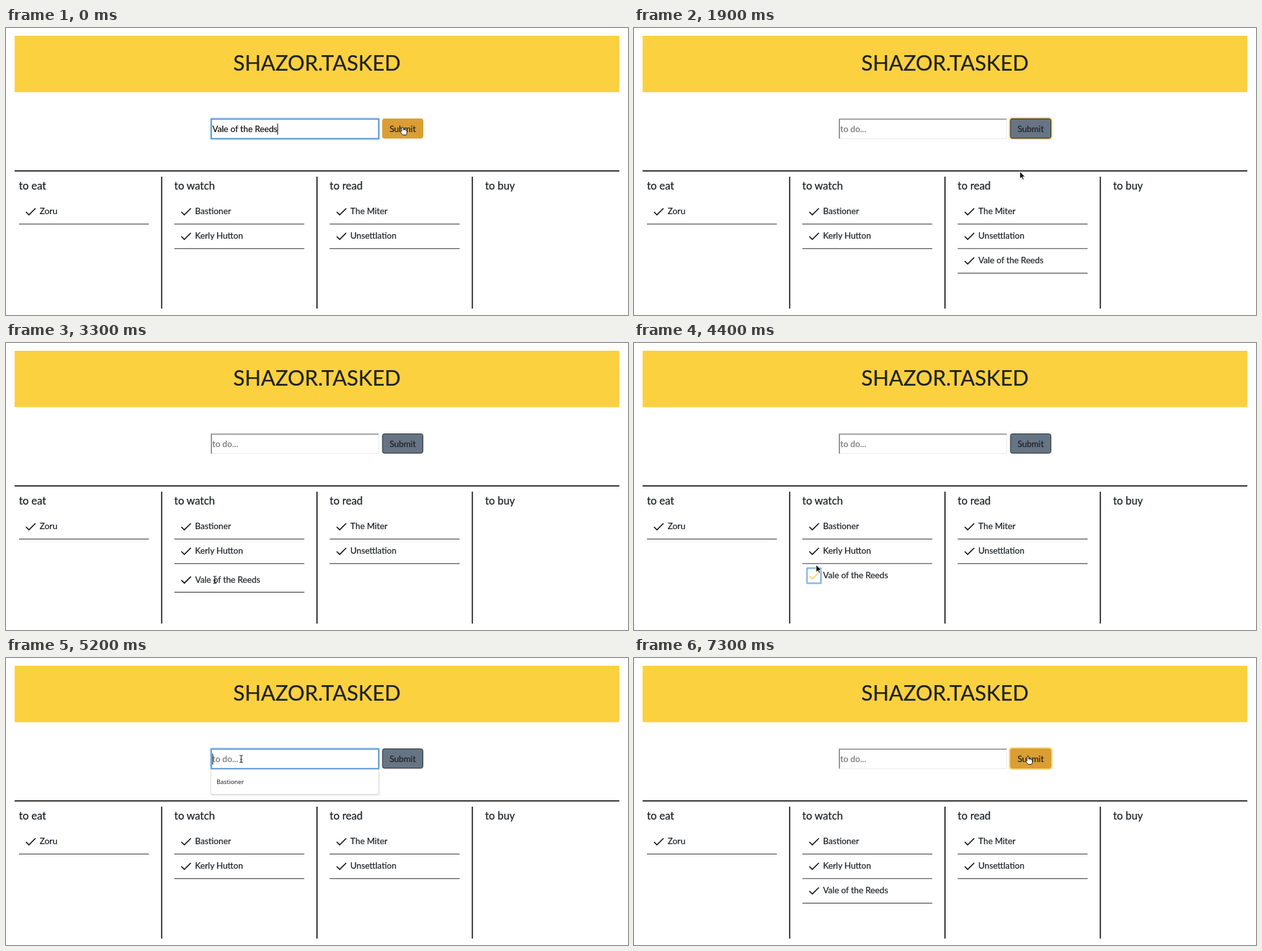
Animation of 960x444 px, one loop 7400 ms. Source, as an HTML page:

```html
<!DOCTYPE html>
<html lang="en">
<head>
<meta charset="utf-8">
<title>To-do list</title>
<style>
  html, body { margin: 0; width: 100%; height: 100%; overflow: hidden; background: #fff; }
  svg { display: block; width: 100%; height: 100%; }
  text {
    font: 13.2px Lato, "Open Sans", sans-serif; white-space: pre;
    color: #1d2125; fill: currentColor; stroke: currentColor; stroke-width: .22;
  }
  .title { font-size: 32.7px; text-anchor: middle; }
  .heading { font-size: 16.4px; }
  .tick { fill: none; stroke: #111; stroke-width: 1.7; }
  .suggestion { font: 9.4px "Noto Sans", sans-serif; stroke: none; }
</style>
</head>
<body>
<svg viewBox="0 0 960 444">
  <rect width="960" height="444" fill="#fff"/>
  <rect x="13.3" y="12" width="933.3" height="87.3" fill="#fcd140"/>
  <text class="title" x="480" y="66">SHAZOR.TASKED</text>

  <g id="plainField" fill="none">
    <path d="M316 171H575V140" stroke="#e6e6e6"/>
    <path d="M317 171V141H575" stroke="#858585" stroke-width="1.7"/>
  </g>
  <g id="focusField" fill="none">
    <rect x="316.3" y="140.3" width="259.4" height="31.4" rx="1.5" stroke="#a5cdf8" stroke-width="3"/>
    <rect x="317" y="141" width="258" height="30" stroke="#4b8acb" stroke-width="1.3"/>
  </g>
  <text id="entry" x="318.5" y="160.5"></text>
  <path id="caret" stroke="#111" stroke-width="1.1" d="M0 148V165"/>

  <rect id="ring" x="578.5" y="138" width="67.5" height="35" rx="5" fill="#fcd980"/>
  <rect id="button" x="581" y="140.5" width="62.5" height="30" rx="3"/>
  <text x="612.2" y="160.5" text-anchor="middle">Submit</text>

  <path d="M13.3 221.2H946.6" stroke="#111" stroke-width="1.8"/>
  <path d="M240.3 230V434M480 230V434M719.7 230V434" stroke="#111" stroke-width="1.7"/>
  <g id="lists"></g>

  <g id="dropdown">
    <rect x="315.5" y="174" width="261" height="38.5" rx="3" fill="#000" opacity=".12"/>
    <rect x="316" y="172.5" width="259.5" height="38.5" rx="2" fill="#fff" stroke="#d4d4d4" stroke-width=".8"/>
    <text class="suggestion" x="325" y="195">Bastioner</text>
  </g>

  <g id="cursor" stroke-linejoin="round">
    <path id="arrow" fill="#111" stroke="#fff" stroke-width=".9"
      d="M0 0V11.6L2.7 9.2 4.6 13.3 6.5 12.4 4.7 8.4H8.3Z"/>
    <path id="hand" fill="#fff" stroke="#111" stroke-width=".9"
      d="M-1.2 7V.8Q0-.8 1.2.8V4.4Q2.3 3.6 3.2 4.6 4.4 4 5 5.2 6.8 5 6.8 6.6V9Q6.8 10.5 5.8 12.5H.4Q-1.5 10-3.4 7.8-3.2 5.6-1.2 7Z"/>
    <path id="beam" fill="none" stroke="#222" stroke-width="1.1"
      d="M-2.5-5.5Q0-5.5 0-4.5V4.5Q0 5.5-2.5 5.5M2.5-5.5Q0-5.5 0-4.5M0 4.5Q0 5.5 2.5 5.5M-1.5 1H1.5"/>
  </g>
</svg>
<script>
const LOOP = 7400;
const NEW_ITEM = "Vale of the Reeds";
const COLUMN = 239.8, ROW = 38;
const lists = [
  ["to eat", "Zoru"],
  ["to watch", "Bastioner", "Kerly Hutton"],
  ["to read", "The Miter", "Unsettlation"],
  ["to buy"]
];

// Event times in ms
const CLICK = 900, ADDED = 1400, GRAB = 2450, DROP = 3350, CHECK = 4200, REMOVED = 4650;
const FOCUS = 5100, TYPE = 5300, TYPED = 5700, CLICK_AGAIN = 6600, ADDED_AGAIN = 7000;

// Pointer stops: time, x, y
const stops = [
  [0, 612, 153], [1650, 612, 153], [2300, 562, 360], [GRAB, 562, 360],
  [2600, 457, 378], [2950, 330, 374], [DROP, 322, 366], [3900, 281, 343],
  [4750, 281, 343], [5050, 363, 156], [5800, 363, 156], [6200, 608, 152], [LOOP, 608, 152]
];

const $ = id => document.getElementById(id);
const show = (id, on) => $(id).setAttribute("visibility", on ? "visible" : "hidden");
const set = (id, name, value) => $(id).setAttribute(name, value);
const between = (t, a, b) => t >= a && t < b;
const place = (id, x, y) => set(id, "transform", `translate(${x} ${y})`);
const columnX = i => 20 + i * COLUMN;
const rowY = i => 265.2 + i * ROW;

const itemMarkup = (label, x, y, id = "") => `
  <g ${id && `id="${id}"`} transform="translate(${x} ${y})">
    ${id && `<rect y="0.7" width="200.5" height="37" fill="#fff"/>
    <g id="tickFocus" fill="none"><rect x="7.2" y="7" width="21.5" height="23.5" rx="1" stroke="#a5cdf8" stroke-width="3"/>
    <rect x="7.2" y="7" width="21.5" height="23.5" stroke="#4a86c5" stroke-dasharray="1 1"/></g>`}
    <path ${id && 'id="newTick"'} class="tick" d="M10.8 19.3L15.4 23.9 25.5 13.8"/>
    <text x="32" y="23">${label}</text>
    <path ${id && 'id="newLine"'} d="M0 38H200.5" stroke="#222" stroke-width="1.1"/>
  </g>`;

$("lists").innerHTML = lists.map(([heading, ...items], i) =>
  `<text class="heading" x="${columnX(i)}" y="249.5">${heading}</text>` +
  items.map((label, j) => itemMarkup(label, columnX(i), rowY(j))).join("")
).join("") + itemMarkup(NEW_ITEM, 0, 0, "newItem");

function pointerAt(t) {
  const i = stops.findIndex(s => s[0] > t);
  const [t0, x0, y0] = stops[i - 1], [t1, x1, y1] = stops[i];
  const p = (t - t0) / (t1 - t0), e = p * p * (3 - 2 * p);
  return [x0 + (x1 - x0) * e, y0 + (y1 - y0) * e];
}

function drawField(t) {
  const focused = t < CLICK || between(t, FOCUS, CLICK_AGAIN);
  const typed = t < CLICK ? NEW_ITEM
    : between(t, TYPE, CLICK_AGAIN)
      ? NEW_ITEM.slice(0, Math.ceil(NEW_ITEM.length * Math.min(1, (t - TYPE + 1) / (TYPED - TYPE))))
      : "";
  const entry = $("entry");
  entry.textContent = typed || "to do...";
  entry.style.color = typed ? "#111" : "#757575";
  show("focusField", focused);
  show("plainField", !focused);
  show("dropdown", between(t, FOCUS, TYPE));

  const blinkStart = t < CLICK ? 0 : t < TYPED ? FOCUS : TYPED;
  const caretOn = between(t, TYPE, TYPED) || (t - blinkStart) % 1000 < 500;
  show("caret", focused && caretOn);
  place("caret", 319 + (typed ? entry.getComputedTextLength() : 0), 0);
}

function drawItem(t, x, y) {
  const dragging = between(t, GRAB, DROP);
  const column = between(t, ADDED, DROP) ? 2 : 1;
  const checked = between(t, CHECK, REMOVED);
  $("newItem").style.display = between(t, ADDED, REMOVED) || t >= ADDED_AGAIN ? "" : "none";
  place("newItem", columnX(column) + (dragging ? x - 562 : 0), rowY(2) + (dragging ? y - 360 : 0));
  $("newTick").style.stroke = checked ? "#f5cf4b" : "#111";
  show("tickFocus", checked);
  show("newLine", !checked);
}

function drawPointer(t, x, y) {
  const inRow = between(y, 140, 172);
  const onButton = inRow && between(x, 581, 644);
  const onText = inRow && between(x, 316, 576) || between(t, 2200, DROP);
  place("cursor", x, y);
  show("hand", onButton);
  show("beam", onText && !between(t, TYPE, TYPED));
  show("arrow", !onButton && !onText);
  set("button", "fill", onButton ? "#da9e33" : "#667484");
  set("button", "stroke", onButton ? "#da9e33" : "#252c34");
  show("ring", between(t, CLICK, GRAB) || t >= CLICK_AGAIN);
}

function draw(now) {
  const t = now % LOOP;
  const [x, y] = pointerAt(t);
  drawField(t);
  drawItem(t, x, y);
  drawPointer(t, x, y);
}

const start = performance.now();
function tick() {
  draw(performance.now() - start);
  requestAnimationFrame(tick);
}
tick();
</script>
</body>
</html>
```
